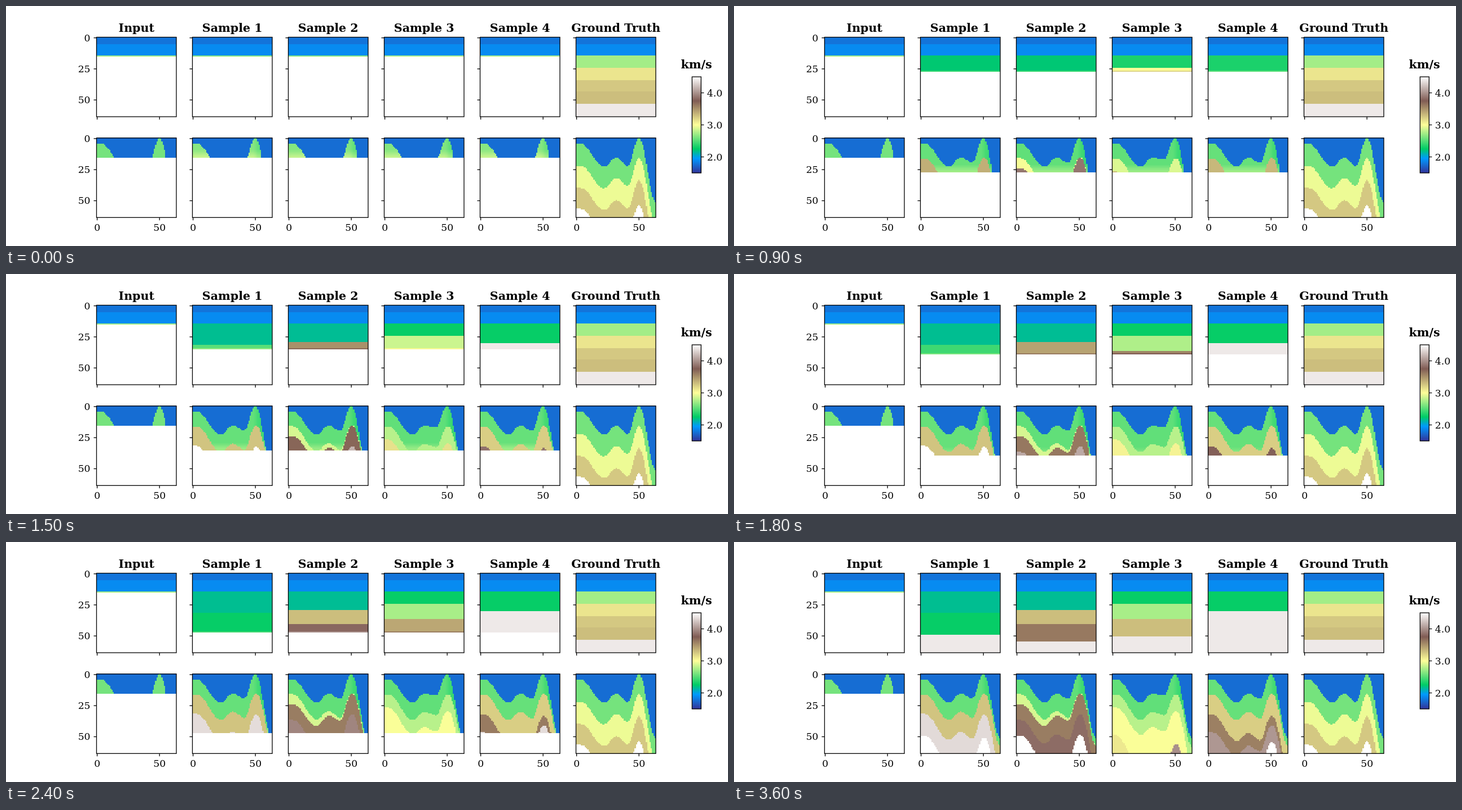
Animation, 1280 px wide and 427 px high, one loop 4.15 s. Source, as an HTML page with a canvas:

```html
<!DOCTYPE html>
<html lang="en">
<head>
<meta charset="utf-8">
<title>Velocity samples</title>
<style>
  html, body { margin: 0; height: 100%; overflow: hidden; background: #fff; }
  canvas { display: block; width: 1280px; height: 427px; }
</style>
</head>
<body>
<canvas id="stage" width="1280" height="427"></canvas>
<script>
const ctx = document.getElementById('stage').getContext('2d');
const N = 64, SIZE = 141.5, CELL = SIZE / N;
const STEP = 300, LOOP = 4150, LAST_STEP = 12;
const KNOWN_ROWS = 16, ROWS_PER_STEP = 4;
const ROW_Y = [55.5, 234.8];
const FONT = '"DejaVu Serif", "Noto Serif", serif';
const clamp = (v, lo = 0, hi = 1) => Math.min(hi, Math.max(lo, v));
const mix = (a, b, f) => a + (b - a) * f;

// Terrain colour map: position, red, green, blue
const STOPS = [
  [0, 51, 51, 153], [.15, 0, 153, 255], [.25, 0, 204, 102],
  [.5, 255, 255, 153], [.75, 128, 92, 84], [1, 255, 255, 255]
];
function terrain(v) {
  v = clamp(v);
  const i = Math.max(1, STOPS.findIndex(s => s[0] >= v));
  const a = STOPS[i - 1], b = STOPS[i], f = (v - a[0]) / (b[0] - a[0]);
  return [1, 2, 3].map(c => Math.round(mix(a[c], b[c], f)));
}

// Per panel: flat bands as [first row, value]; folded layers as
// [offset at left hill, offset at peak, value]; depth of the saddle beside the peak
const truth = {
  title: 'Ground Truth', saddle: 22.8,
  bands: [[15, .41], [25, .54], [35, .585], [44, .6], [54, .967]],
  layers: [[0, 0, .365], [18, 16, .482], [35.5, 34, .585], [52.5, 54, 1]]
};
const panels = [
  { ...truth, title: 'Input' },
  { title: 'Sample 1', sampled: true, saddle: 20,
    bands: [[15, .222], [32, .256], [50, .967]],
    layers: [[0, 0, .35], [11.7, 16.5, .59], [27.5, 33.5, .943], [45, 52, 1]] },
  { title: 'Sample 2', sampled: true, saddle: 20.5,
    bands: [[15, .22], [30, .6], [41, .705], [55, .967]],
    layers: [[0, 0, .345], [11.5, 16, .46], [20, 16.5, .7], [32.5, 33, .775], [45, 49.5, .985]] },
  { title: 'Sample 3', sampled: true, saddle: 17.5,
    bands: [[15, .256], [25, .415], [37, .6], [51, .967]],
    layers: [[0, 0, .345], [12, 17, .43], [22.5, 30.5, .495], [44.5, 70, .525], [75, 57, .72]] },
  { title: 'Sample 4', sampled: true, saddle: 20.5,
    bands: [[15, .256], [31, .967]],
    layers: [[0, 0, .35], [12, 16.5, .575], [28, 34.5, .695], [42.5, 42, .84], [60, 55.5, .99]] },
  truth
];

// A newly drawn layer starts with a higher value and settles as the drawing goes deeper
const settle = (value, top, depth) => value + .11 * clamp(1 - (depth - top) / 16);

function flatValue({ bands, sampled }, depth) {
  return (col, row) => {
    if (row < 15) return row < 6 ? .095 : .13;
    const [top, value] = bands.findLast(band => row >= band[0]);
    if (!sampled) return value;
    const newest = row === depth - 1 && depth < N ? .06 : 0;
    return Math.min(.967, settle(value, top, depth) + newest);
  };
}

// Shape of the uppermost fold: hill, trough, hill, saddle, peak, right flank
function foldDepth(col, saddle) {
  const keys = [[4, 5], [22.5, 23.5], [32.5, 15.8], [41.5, saddle], [50.5, 0], [64, 52]];
  const i = clamp(keys.findIndex(k => k[0] >= col), 1, keys.length - 1);
  const [x0, y0] = keys[i - 1], [x1, y1] = keys[i];
  const f = clamp((col - x0) / (x1 - x0));
  return mix(y0, y1, (1 - Math.cos(Math.PI * f)) / 2);
}
function foldValue({ layers, saddle, sampled }, depth) {
  return (col, row) => {
    const x = col + .5;
    const below = row + .5 - foldDepth(x, saddle);
    const pinch = sampled ? 10 * clamp((x - 51) / 6) : 0;
    const across = clamp((x - 4) / 46.5);
    const index = layers.findLastIndex(([left, peak], i) =>
      below >= (i && mix(left, peak, across) - pinch));
    if (index < 0) return .085;
    const [left, , value] = layers[index];
    if (!sampled) return value;
    const shade = index ? 0 : .07 * clamp((row - depth + 7) / 7) * (depth < N)
      - .04 * Math.exp(-(((col - 54) / 4) ** 2));
    return settle(value, 5 + left, depth) + shade;
  };
}

const tile = document.createElement('canvas');
tile.width = tile.height = N;
const tileCtx = tile.getContext('2d');
function drawField(x, y, depth, valueAt) {
  const image = tileCtx.createImageData(N, N);
  for (let row = 0; row < depth; row++)
    for (let col = 0; col < N; col++)
      image.data.set([...terrain(valueAt(col, row)), 255], (row * N + col) * 4);
  tileCtx.putImageData(image, 0, 0);
  ctx.drawImage(tile, x, y - .6, SIZE, SIZE);
}

function text(label, x, y, align, bold) {
  ctx.font = bold ? `bold 20.6px ${FONT}` : `17.2px ${FONT}`;
  ctx.textAlign = align;
  ctx.fillText(label, x, y);
}
function line(x1, y1, x2, y2) {
  ctx.beginPath();
  ctx.moveTo(x1, y1);
  ctx.lineTo(x2, y2);
  ctx.stroke();
}

function drawAxes(x, y, column, row) {
  ctx.strokeRect(x, y, SIZE, SIZE);
  for (const tick of [0, 25, 50]) {
    const offset = (tick + .5) * CELL;
    line(x - 5, y + offset, x, y + offset);
    if (column === 0) text(tick, x - 11, y + offset + 5.9, 'right');
    if (tick === 25) continue;
    line(x + offset, y + SIZE, x + offset, y + SIZE + 5);
    if (row === 1) text(tick, x + offset, y + SIZE + 23.5, 'center');
  }
}

function drawColorbar() {
  const x = 1216.3, y = 126, w = 16, h = 171;
  for (let i = 0; i < h; i++) {
    ctx.fillStyle = `rgb(${terrain(1 - (i + .5) / h)})`;
    ctx.fillRect(x, y + i, w, 1);
  }
  ctx.fillStyle = '#000';
  ctx.strokeRect(x, y, w, h);
  for (const speed of [2, 3, 4]) {
    const tickY = y + h * (4.5 - speed) / 3;
    line(x + w, tickY, x + w + 5, tickY);
    text(speed.toFixed(1), x + w + 10.5, tickY + 6.3, 'left');
  }
  text('km/s', 1224, 111, 'center', true);
}

function drawScene(step) {
  ctx.fillStyle = '#fff';
  ctx.fillRect(0, 0, 1280, 427);
  ctx.fillStyle = ctx.strokeStyle = '#000';
  ctx.lineWidth = 1.3;
  ctx.imageSmoothingEnabled = false;
  panels.forEach((panel, i) => {
    const x = 160.5 + 170 * i;
    const depth = panel === truth ? N : KNOWN_ROWS + (panel.sampled ? ROWS_PER_STEP * step : 0);
    [flatValue, foldValue].forEach((field, row) => {
      drawField(x, ROW_Y[row], depth, field(panel, depth));
      drawAxes(x, ROW_Y[row], i, row);
    });
    text(panel.title, x + SIZE / 2, 46.2, 'center', true);
  });
  drawColorbar();
}

let shown = -1;
function tick() {
  const step = Math.min(LAST_STEP, Math.floor(performance.now() % LOOP / STEP));
  if (step !== shown) drawScene(shown = step);
  requestAnimationFrame(tick);
}
tick();
</script>
</body>
</html>
```
